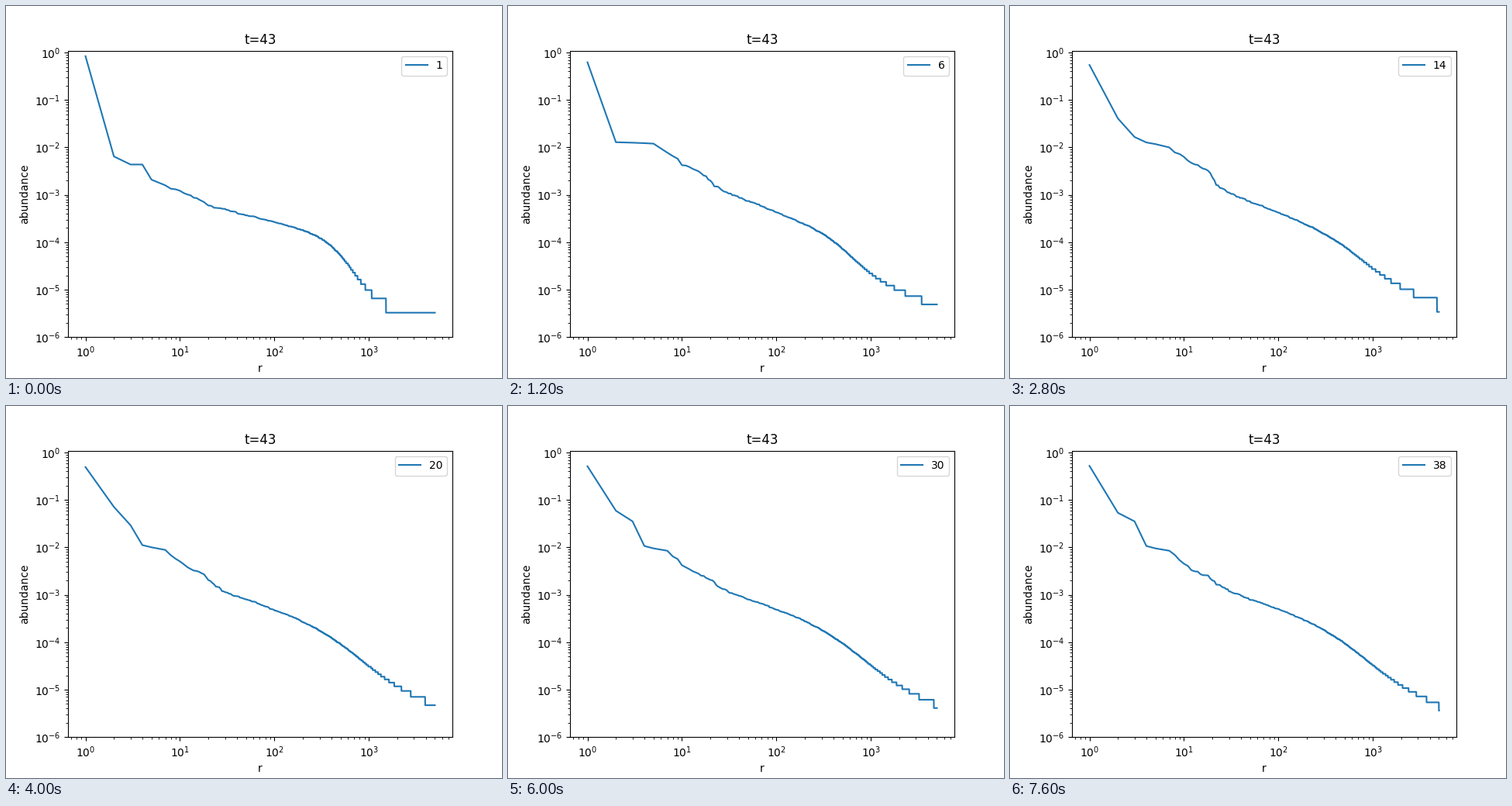
A matplotlib script that plays this animation: 640 by 480 pixels, repeating every 8000 ms.

```python
import numpy as np
import matplotlib.pyplot as plt
from matplotlib.animation import FuncAnimation

FRAMES, INTERVAL = 20, 400
SPECIES = 5000
ranks = np.arange(1, SPECIES + 1)
x = np.log10(ranks)

# All levels are -log10(abundance). Each stage gives the few dominant species
# and the tail: level at rank 60, slope, drop height, drop steepness, drop position.
HEAD_RANKS = [1, 2, 3, 4, 5, 7, 12, 18, 22]
TAIL_START = 30
STAGES = {
    0: ([0.075, 2.19, 2.36, 2.36, 2.68, 2.80, 3.01, 3.16, 3.25],
        [3.46, 0.50, 1.25, 7.0, 2.83]),
    3: ([0.205, 1.89, 1.90, 1.91, 1.92, 2.11, 2.42, 2.61, 2.79],
        [3.19, 0.78, 0.66, 6.5, 2.80]),
    7: ([0.26, 1.39, 1.78, 1.895, 1.93, 2.00, 2.32, 2.50, 2.80],
        [3.20, 0.77, 0.64, 4.9, 2.88]),
    11: ([0.28, 1.27, 1.45, 1.97, 2.02, 2.07, 2.47, 2.61, 2.76],
         [3.13, 0.66, 0.97, 3.8, 2.93]),
}
LABELS = {0: 1, 12: 23}   # all other labels count up in twos


def blend(pos, part):
    """Mix the given part of the stages at a position in time."""
    columns = zip(*(stage[part] for stage in STAGES.values()))
    return np.array([np.interp(pos, list(STAGES), c) for c in columns])


def abundance(frame):
    # The first stage gives way quickly, then changes follow the frame.
    pos = 3 * (frame / 3) ** 0.35 if frame < 3 else frame
    head = blend(pos, 0)
    level, slope, drop, steepness, centre = blend(pos, 1)

    # The runner-up surges for a moment at the cost of the leader.
    surge = np.exp(-((frame - 12) / 2) ** 2)
    head[:2] += surge * np.array([0.08, -0.42])

    tail = (level + slope * (x - np.log10(60))
            + drop / (1 + np.exp(-steepness * (x - centre))))
    knots = np.log10(HEAD_RANKS + [TAIL_START])
    logs = np.interp(x, knots, [*head, tail[TAIL_START - 1]])
    logs = np.where(ranks < TAIL_START, logs, tail)

    wobble = np.random.default_rng(frame).normal(0, 0.02, SPECIES)
    logs = np.sort(logs + np.where(ranks > 7, wobble, 0))

    # Whole individuals only, which makes the steps at the rare end.
    one = 1e-6 * np.interp(frame, [0, 1, 3, 7, 10, 19],
                           [3.27, 2.14, 2.44, 3.4, 2.35, 1.8])
    return one * np.maximum(np.round(10 ** -logs / one), 1)


fig, ax = plt.subplots(figsize=(6.4, 4.8), dpi=100)
line, = ax.plot(ranks, abundance(0), label="1")
ax.set_xscale("log")
ax.set_yscale("log")
ax.set_ylim(1e-6, 1.1)
ax.set_xlabel("r")
ax.set_ylabel("abundance")
ax.set_title("t=43")
legend = ax.legend(loc="upper right")


def update(frame):
    line.set_ydata(abundance(frame))
    legend.get_texts()[0].set_text(str(LABELS.get(frame, 2 * frame)))
    return line, legend


anim = FuncAnimation(fig, update, frames=FRAMES, interval=INTERVAL,
                     repeat=True, repeat_delay=0, blit=False)
plt.show()
```
